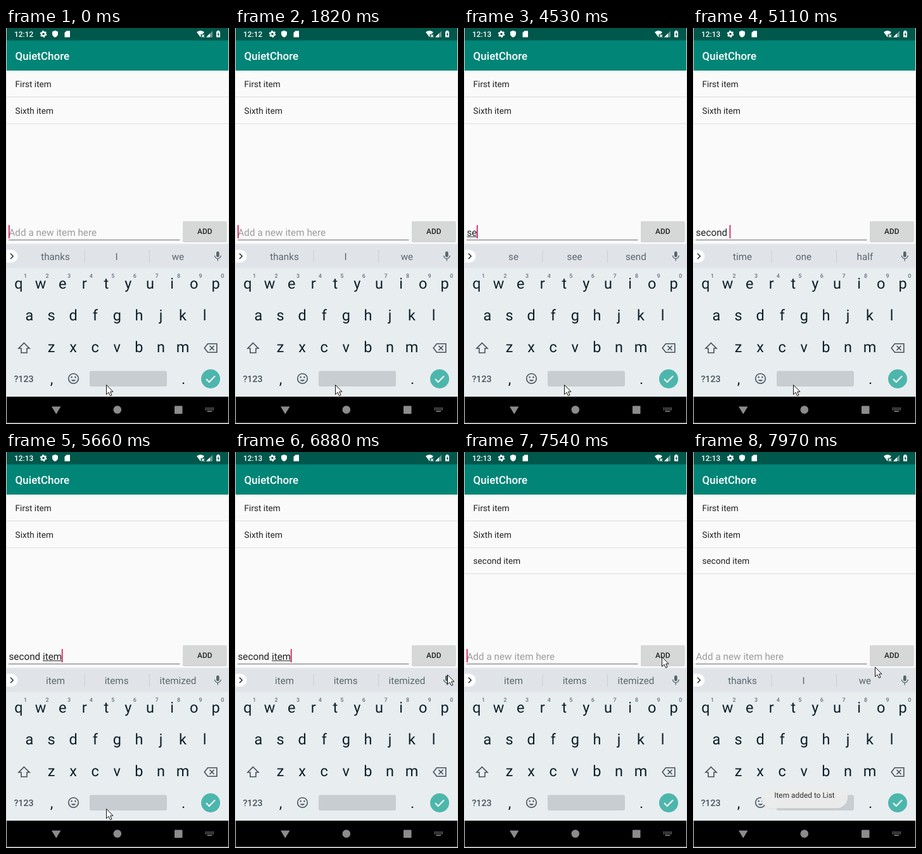
Write an HTML page that moves like this. It is 352 px wide and 623 px high and loops after 8000 ms.

```html
<!DOCTYPE html>
<html lang="en">
<head>
<meta charset="utf-8">
<title>QuietChore</title>
<style>
  html, body { margin: 0; width: 100%; height: 100%; overflow: hidden; background: #fafafa; }
  svg { display: block; width: 352px; height: 623px; }
  text { font-family: Roboto, sans-serif; text-rendering: geometricPrecision; white-space: pre; }
  .mid { text-anchor: middle; }
  .medium { font-weight: 500; }
  .item { font-size: 13.6px; fill: #212121; }
  .field { font-size: 15.3px; fill: #212121; }
  .hint { fill: #9c9c9c; }
  .suggestion { font-size: 15.2px; fill: #5b666d; }
  .key { font-size: 23.5px; fill: #0c1f29; }
  .digit { font-size: 9px; font-weight: 500; fill: #66727a; }
  .line { fill: none; stroke: #44525b; stroke-width: 1.6; }
</style>
</head>
<body>
<svg viewBox="0 0 352 623">
  <rect width="352" height="623" fill="#fafafa"/>

  <!-- status bar and title -->
  <rect width="352" height="20" fill="#00574b"/>
  <rect y="19.5" width="352" height="47.5" fill="#008577"/>
  <text id="clock" class="medium" x="13" y="13.8" font-size="11.9" fill="#fff"></text>
  <g fill="#fff">
    <circle cx="59" cy="9.5" r="3" fill="none" stroke="#fff" stroke-width="2.4"/>
    <circle cx="59" cy="9.5" r="4.6" fill="none" stroke="#fff" stroke-width="1.6" stroke-dasharray="2.4 2.42"/>
    <path d="M77.5 4l4.5 1.8v3.4c0 2.700-2 4.800-4.500 5.600c-2.500-.8-4.500-2.900-4.500-5.600V5.800z"/>
    <path d="M95.500 4.500h5.500v10h-8.500V7.500z"/>
    <path d="M301 6.500Q307 2 313 6.500L310.500 9.500H307.500V14L307 14.500z"/>
    <path d="M309 10.500l4 4m0-4l-4 4" stroke="#fff" stroke-width="1.200"/>
    <path d="M316 14.500L326 4.500V14.500z" opacity=".4"/>
    <path d="M316 14.500L322 8.500V14.500z"/>
    <path d="M332 5.500h1.500V4h3v1.500H338v9h-6z"/>
    <path d="M335.600 6.500l-2.200 3.900h1.400v3l2.200-3.900h-1.400z" fill="#00574b"/>
  </g>
  <text class="medium" x="14.600" y="50" font-size="17" fill="#fff">QuietChore</text>

  <!-- list -->
  <g fill="#dcdcdc">
    <rect y="108" width="352" height="1"/>
    <rect y="150" width="352" height="1"/>
  </g>
  <text class="item" x="14.600" y="93">First item</text>
  <text class="item" x="14.600" y="134.500">Sixth item</text>
  <g id="added">
    <rect y="191" width="352" height="1" fill="#dcdcdc"/>
    <text class="item" x="14.600" y="176">second item</text>
  </g>

  <!-- input row -->
  <text id="hint" class="field hint" x="4.400" y="326.500">Add a new item here</text>
  <text id="entry" class="field" x="4.400" y="326.500"><tspan id="done"></tspan><tspan id="typing"></tspan></text>
  <rect id="underline" y="328" height="1" fill="#333"/>
  <rect x="4" y="333" width="270.500" height="1" fill="#6c6c6c"/>
  <rect id="caret" y="310" width="1.700" height="21" fill="#d81b60"/>
  <rect x="279" y="305" width="69.500" height="32" rx="2" fill="#000" opacity=".18"/>
  <rect id="button" x="279" y="304" width="69.500" height="32" rx="2"/>
  <text class="medium mid" x="313.800" y="324.300" font-size="11.900" fill="#212121">ADD</text>

  <!-- keyboard -->
  <rect y="339" width="352" height="1" fill="#eff1f2"/>
  <rect y="340" width="352" height="38" fill="#e0e4e8"/>
  <rect y="377.500" width="352" height="203" fill="#e8edf0"/>
  <path d="M0 349H8.500a10 10 0 0 1 0 20H0z" fill="#fff"/>
  <path d="M7 354.800l4.200 4.200l-4.200 4.200" class="line" style="stroke:#26343c"/>
  <path d="M124 349v20M226.500 349v20" stroke="#cbd0d4"/>
  <g id="suggestions">
    <text class="suggestion mid" x="78" y="364.500"></text>
    <text class="suggestion mid" x="174.600" y="364.500"></text>
    <text class="suggestion mid" x="271.400" y="364.500"></text>
  </g>
  <rect x="332" y="351.500" width="4.600" height="9" rx="2.300" fill="#56636b"/>
  <path d="M329.500 358a4.800 4.800 0 0 0 9.600 0M334.300 363v3.500" class="line" style="stroke:#56636b;stroke-width:1.300"/>
  <g id="keys"></g>
  <path d="M28.500 495.500l8.500 8.500h-4v7h-9v-7h-4z" class="line"/>
  <path d="M318.500 496.800h14.300v13.400h-14.300l-5.300-6.700zM321.500 500l7 7m0-7l-7 7" class="line"/>
  <text class="mid medium" x="28" y="557" font-size="14.200" fill="#44525b">?123</text>
  <circle cx="106.500" cy="551.500" r="7.800" class="line"/>
  <path d="M102.800 553.500a4 3.500 0 0 0 7.400 0z" fill="#44525b"/>
  <path d="M102.500 549.300h2.200m3.600 0h2.200" class="line" style="stroke-width:2.200"/>
  <rect x="132" y="539.500" width="122" height="24.500" rx="3" fill="#c8cdd1"/>
  <circle cx="323" cy="552" r="15" fill="#4db6ac"/>
  <path d="M316 552.300l4.700 4.700l9.300-9.500" fill="none" stroke="#fff" stroke-width="2"/>

  <!-- navigation bar -->
  <rect y="580" width="352" height="41.500" fill="#000"/>
  <g fill="#8c8c8c">
    <path d="M72 595.500h14.500l-7.250 12z"/>
    <circle cx="175.800" cy="600.500" r="6.300"/>
    <rect x="266" y="594.500" width="12.500" height="12.500" rx="1"/>
    <path d="M314.500 598h13.500m-13.500 2.500h13.500" stroke="#8c8c8c" stroke-width="1.500" stroke-dasharray="1.500 .9"/>
    <path d="M317.500 603.200h7.500" stroke="#8c8c8c" stroke-width="1.500"/>
  </g>
  <path d="M.5 0V622.300H351.500V0" fill="none" stroke="#dedede"/>

  <g id="toast">
    <rect x="107" y="526" width="138" height="35.500" rx="17.500" fill="#000" opacity=".06"/>
    <rect x="107.500" y="525" width="137" height="35.500" rx="17.500" fill="#ececec"/>
    <text class="mid" x="176" y="544" font-size="11.900" fill="#2a2a2a">Item added to List</text>
  </g>
  <path id="mouse" d="M.5 .5V15.500L4 12.200L6.500 17.500L9 16.400L6.600 11.200H11z" fill="#fff" stroke="#111" stroke-width="1"/>
</svg>
<script>
const LOOP = 8000;
const $ = id => document.getElementById(id);

function addKey(x, y, label, kind) {
  const key = document.createElementNS('http://www.w3.org/2000/svg', 'text');
  key.setAttribute('class', 'mid ' + kind);
  key.setAttribute('x', x);
  key.setAttribute('y', y);
  key.textContent = label;
  $('keys').append(key);
}
function addRow(letters, x, y) {
  [...letters].forEach((letter, i) => addKey(x + i * 34.58, y, letter, 'key'));
}
addRow('qwertyuiop', 20, 410);
addRow('asdfghjkl', 37, 460);
addRow('zxcvbnm', 71.5, 510);
addRow(',', 72, 559.5);
addRow('.', 280, 559.5);
[...'1234567890'].forEach((digit, i) => addKey(30.5 + i * 34.58, 393, digit, 'digit'));

const start = {
  clock: '12:12', caret: true, done: '', typing: '', words: 'thanks I we',
  mouse: [158, 561], pressed: false, added: false, toast: 0
};
const on = { caret: true }, off = { caret: false };
const type = (typing, words) => ({ caret: true, typing, words });

// Each step changes only the listed parts of the state.
const steps = [
  [430, off], [830, on], [1420, off], [1820, on], [2370, off], [2780, on], [3330, off],
  [3450, { clock: '12:13' }], [3850, on], [4260, off],
  [4410, type('s', 's so say')],
  [4530, type('se', 'se see send')],
  [4810, type('seco', 'seco second seconds')],
  [4960, type('secon', 'secon second seconds')],
  [5110, { done: 'second ', typing: '', words: 'time one half' }],
  [5390, type('it', 'it its item')],
  [5540, type('ite', 'ite item items')],
  [5660, type('item', 'item items itemized')],
  [6220, off],
  [6490, { caret: true, mouse: [246, 455] }],
  [6610, { mouse: [336, 347] }],
  [6760, { mouse: [340, 348] }],
  [6880, { mouse: [335, 350] }],
  [7030, { caret: false, mouse: [322, 333] }],
  [7150, { mouse: [312, 322] }],
  [7270, { pressed: true }],
  [7390, { caret: true, done: '', typing: '', added: true }],
  [7540, { pressed: false }],
  [7690, { words: 'thanks I we', mouse: [287, 338] }],
  [7820, { caret: false, toast: 0.6 }],
  [7970, { toast: 0.96 }]
];

const show = (id, visible) => $(id).setAttribute('visibility', visible ? 'visible' : 'hidden');

function draw(state) {
  $('clock').textContent = state.clock;
  $('done').textContent = state.done;
  $('typing').textContent = state.typing;
  const left = 4.4 + (state.done ? $('done').getComputedTextLength() : 0);
  const width = state.typing ? $('typing').getComputedTextLength() : 0;
  $('underline').setAttribute('x', left);
  $('underline').setAttribute('width', width);
  $('caret').setAttribute('x', left + width - 0.4);
  show('caret', state.caret);
  show('hint', !state.done && !state.typing);
  show('added', state.added);
  const words = state.words.split(' ');
  [...$('suggestions').children].forEach((slot, i) => slot.textContent = words[i]);
  $('button').setAttribute('fill', state.pressed ? '#c4c5c5' : '#d6d7d7');
  $('toast').setAttribute('opacity', state.toast);
  $('mouse').setAttribute('transform', `translate(${state.mouse})`);
}

let shown = -1;
function tick() {
  const time = performance.now() % LOOP;
  const past = steps.filter(([at]) => at <= time);
  if (past.length !== shown) {
    shown = past.length;
    draw(Object.assign({}, start, ...past.map(([, change]) => change)));
  }
  requestAnimationFrame(tick);
}
tick();
</script>
</body>
</html>
```
